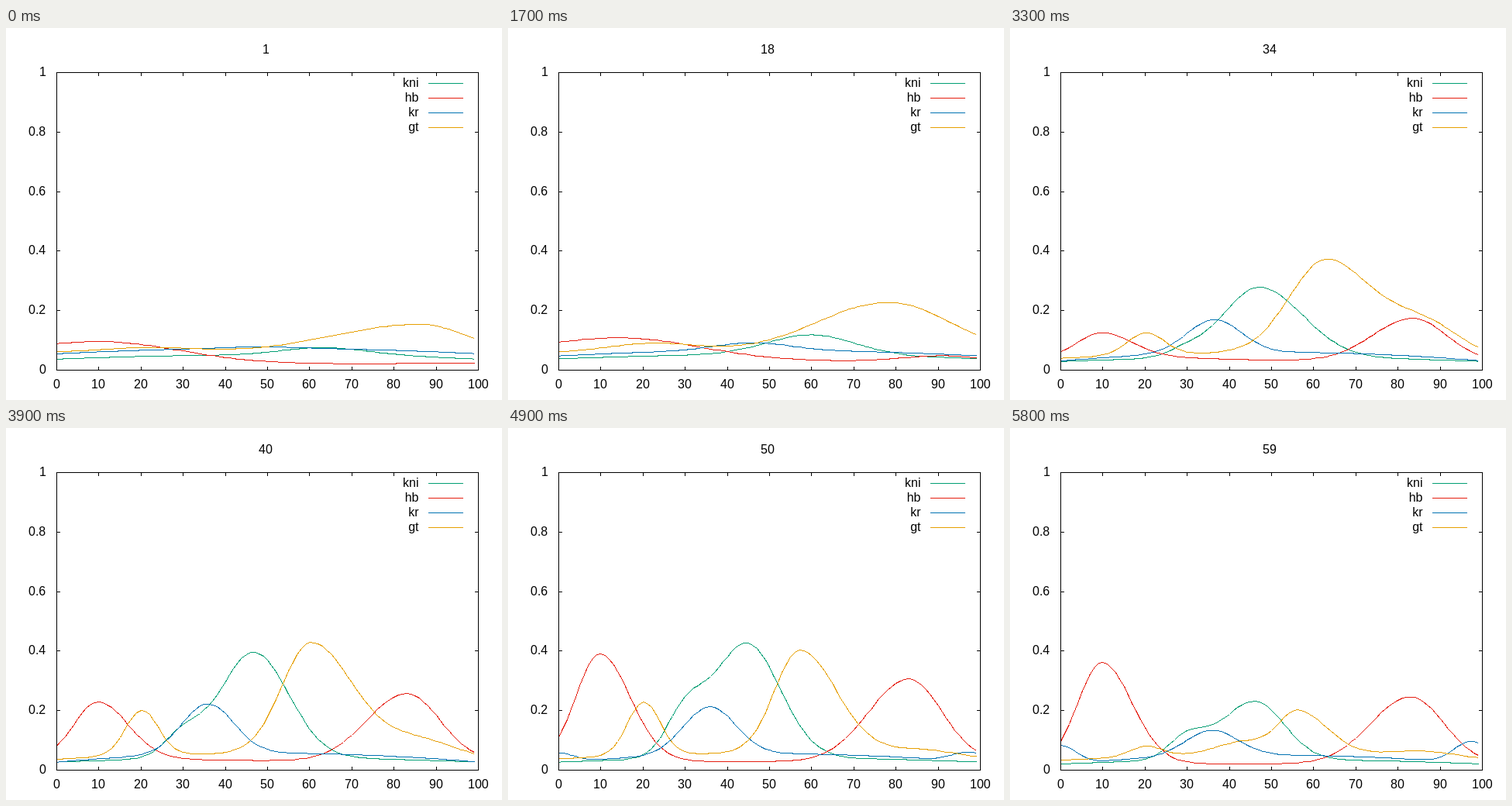
Recreate the animation shown at these times as an HTML page. Size 640x480 px, loop 5.9 s.

```html
<!DOCTYPE html>
<html lang="en">
<head>
<meta charset="utf-8">
<title>Profiles over time</title>
<style>
  html, body { margin: 0; width: 100%; height: 100%; overflow: hidden; background: #fff; }
  svg { display: block; width: 640px; height: 480px; }
  path { fill: none; stroke-width: 1; shape-rendering: crispEdges; }
  text { font: 16px "Liberation Sans", Arial, sans-serif; }
</style>
</head>
<body>
<svg id="plot" viewBox="0 0 640 480"></svg>
<script>
const STEP = 100, STEPS = 59, LAST = 99, DIGIT = 9;
const BOX = { left: 65, right: 609, top: 57, bottom: 441 };
const KEY_STEPS = [0, 10, 24, 33, 39, 49, 58];

// A track is a constant, a pair that eases from early to late,
// or values at the key steps (the last one holds).
const bump = (at, height, left, right = left) => ({ at, height, left, right });

// Each profile is a low arch plus bell-shaped bumps, heights in thousandths.
const series = {
  kni: {
    color: '#009e73', ends: [37, 40, 34, 29, 27, 27, 21], arch: 14,
    bumps: [
      bump([63, 62, 57, 47, 46.7, 44.5, 46], [26, 53, 88, 236, 355, 386, 196],
        [9, 9, 12, 8.3, 8], [11, 9, 11, 10.3, 8.3, 8, 7]),
      bump(30, [0, 0, 0, 25, 75, 135, 73], 4.5)
    ]
  },
  hb: {
    color: '#e51e10', ends: [21, 26, 32, 32, 31, 29, 21], arch: 0,
    bumps: [
      bump([10, 18, 11], [75, 92, 54, 15, 8, 0], 22, 19),
      bump(9.7, [0, 0, 0, 78, 190, 362, 340], 5.6, 7.2),
      bump([91, 83], [2, 8, 39, 142, 226, 277, 225], 9.4, 7.9)
    ]
  },
  kr: {
    color: '#0072b2', ends: [55, 52, 42, 31, 27, 25, 20], arch: [18, 30],
    bumps: [
      bump([48, 51, 39, 36.3, 35.8], [5, 22, 31, 112, 168, 160, 86], [9, 6.2]),
      bump(0, [0, 0, 0, 0, 0, 32, 63], 3.5),
      bump(97.5, [0, 0, 0, 0, 0, 32, 74], 4)
    ]
  },
  gt: {
    color: '#e69f00', ends: [60, 60, 52, 40, 37, 38, 33], arch: [0, 19],
    bumps: [
      bump([22, 25, 20.2], [16, 37, 28, 74, 152, 178, 35], [11, 3.9]),
      bump([86, 81, 75, 63, 60.3, 57.2, 56.5], [94, 116, 242, 313, 373, 346, 141],
        [20, 17.7, 16.5, 8.7, 6.9, 6, 4.5], [11, 13, 15.4, 10.5, 9.9, 8.7, 7]),
      bump(86, [0, 0, 0, 108, 55, 22, 22], 8.7),
      bump(44, [0, 0, 0, 0, 0, 0, 45], 7)
    ]
  }
};

const svg = document.getElementById('plot');
const toX = v => BOX.left + v / 100 * (BOX.right - BOX.left);
const toY = v => BOX.bottom - v * (BOX.bottom - BOX.top);

function add(tag, attrs, content = '') {
  const el = document.createElementNS('http://www.w3.org/2000/svg', tag);
  for (const name in attrs) el.setAttribute(name, attrs[name]);
  el.textContent = content;
  return svg.appendChild(el);
}

const label = (x, y, content, anchor = 'start') =>
  add('text', { x, y, 'text-anchor': anchor }, content);

// Whole-pixel start of a number centred on x
const numberStart = (x, n) => Math.round(x) - Math.floor(String(n).length * DIGIT / 2);

// Pixel-centred polyline path
const line = points =>
  'M' + points.map(([x, y]) => `${Math.round(x) + 0.5} ${Math.round(y) + 0.5}`).join('L');

// Smooth passage through the key values without overshoot
function throughKeys(values, step) {
  const n = KEY_STEPS.length - 1;
  const value = i => values[Math.min(i, values.length - 1)];
  const rate = i => (value(i + 1) - value(i)) / (KEY_STEPS[i + 1] - KEY_STEPS[i]);
  const slope = i => {
    const a = rate(Math.max(i - 1, 0)), b = rate(Math.min(i, n - 1));
    return a * b > 0 ? 2 * a * b / (a + b) : 0;
  };
  let i = 0;
  while (i < n - 1 && step > KEY_STEPS[i + 1]) i++;
  const h = KEY_STEPS[i + 1] - KEY_STEPS[i], t = (step - KEY_STEPS[i]) / h, u = 1 - t;
  return value(i) * u * u * (1 + 2 * t) + value(i + 1) * t * t * (3 - 2 * t)
    + h * t * u * (slope(i) * u - slope(i + 1) * t);
}

function track(values, step) {
  if (!Array.isArray(values)) return values;
  if (values.length > 2) return throughKeys(values, step);
  const t = Math.min(1, Math.max(0, (step - 22) / 13));
  return values[0] + (values[1] - values[0]) * t * t * (3 - 2 * t);
}

function curve({ ends, arch, bumps }, step) {
  const low = track(ends, step), rise = track(arch, step);
  const now = bumps.map(b => bump(...Object.values(b).map(v => track(v, step))));
  const height = x => now.reduce((sum, b) => {
    const d = (x - b.at) / (x < b.at ? b.left : b.right);
    return sum + b.height * Math.exp(-d * d / 2);
  }, low + rise * (1 - (x / 50 - 1) ** 2));
  return line(Array.from({ length: LAST + 1 }, (_, x) => [toX(x), toY(height(x) / 1000)]));
}

const title = label(0, 33, '');

Object.entries(series).forEach(([name, s], i) => {
  const y = 71 + 19 * i;
  label(532.5, y + 5, name, 'end');
  add('path', { d: line([[544, y], [589, y]]), stroke: s.color });
  s.path = add('path', { stroke: s.color });
});

const { left, right, top: ceiling, bottom } = BOX;
let axes = line([[left, ceiling], [right, ceiling], [right, bottom], [left, bottom]]) + 'Z';
for (let v = 0; v <= 100; v += 10) {
  const x = toX(v);
  axes += line([[x, bottom], [x, bottom - 5]]) + line([[x, ceiling], [x, ceiling + 4]]);
  label(numberStart(x, v), 465, v);
}
for (let i = 0; i <= 5; i++) {
  const y = toY(i / 5);
  axes += line([[left, y], [left + 4, y]]) + line([[right, y], [right - 5, y]]);
  label(i % 5 ? 29 : 43, Math.round(y) + 5, i / 5);
}
add('path', { d: axes, stroke: '#000' });

let shown = -1;
function draw() {
  const step = Math.floor(performance.now() / STEP) % STEPS;
  if (step !== shown) {
    shown = step;
    title.textContent = step + 1;
    title.setAttribute('x', numberStart(335, step + 1));
    for (const s of Object.values(series)) s.path.setAttribute('d', curve(s, step));
  }
  requestAnimationFrame(draw);
}
draw();
</script>
</body>
</html>
```
